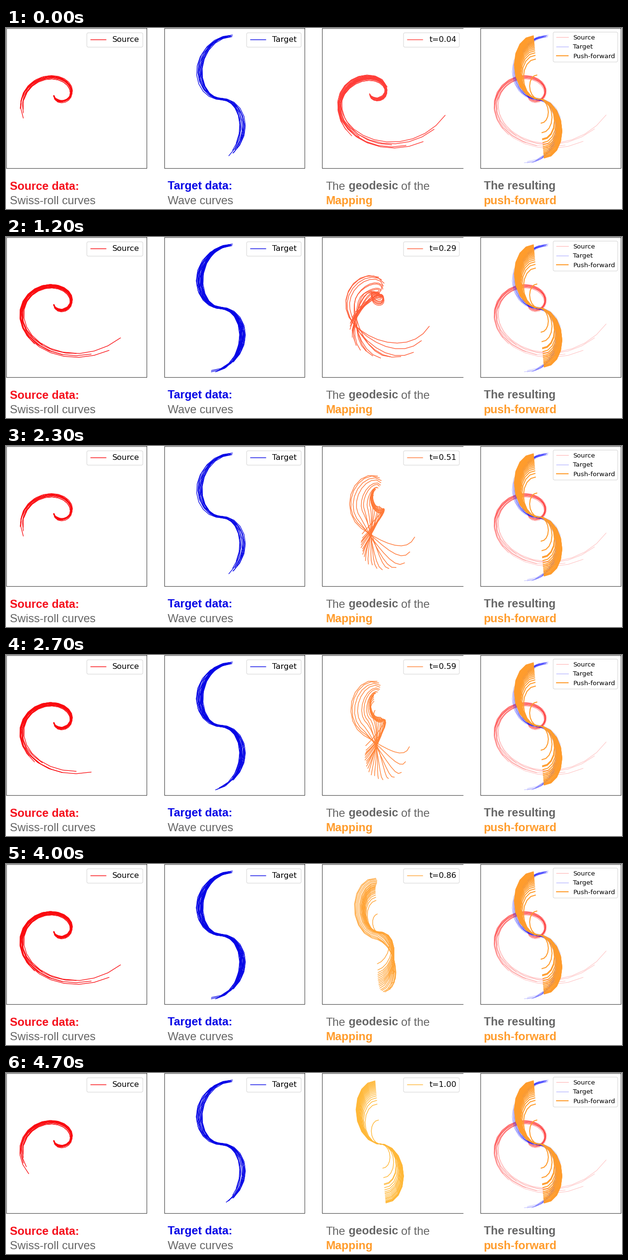
A matplotlib script for the animation above (4.8 s loop, 1280 by 378 pixels).

```python
import numpy as np
import matplotlib.pyplot as plt
from matplotlib.animation import FuncAnimation
from matplotlib.patches import FancyBboxPatch

W, H, DPI = 1280, 378, 100
PX = 72 / DPI  # points per pixel
FRAMES, STEP_MS = 48, 100
CURVES, SAMPLES, CYCLE = 21, 18, 23
RED, BLUE, ORANGE, GRAY = "#f5101c", "#0505e6", "#ff9c2c", "#666666"
rng = np.random.default_rng(11)

# Spiral whose radius of curvature grows with its heading (in quarter turns)
TURN = np.linspace(0, 6, 1201)
STEP = np.pi / 2 * (14.5 + 3 * TURN ** 2.27) * TURN[1]
SPIRAL_X = 99 + np.cumsum(STEP * np.sin(TURN * np.pi / 2))
SPIRAL_Y = 140 + .85 * np.cumsum(STEP * np.cos(TURN * np.pi / 2))


def roll(q):
    """Swiss-roll piece; a larger q starts and ends further out."""
    end = 3.85 + 1.8 * q ** 2
    start = 2.6 * q ** 2
    n = start + (end - start) * np.linspace(0, 1, SAMPLES) ** .75
    pts = np.column_stack([np.interp(n, TURN, SPIRAL_X),
                           np.interp(n, TURN, SPIRAL_Y)])
    mid = np.array([110, 135])
    return (mid + (pts - mid) * rng.uniform(.94, 1.06)
            + rng.uniform(-1, 1, 2) * (1.5, 2.5))


def s_shape(a, width, lean):
    """Two mirrored arcs around the origin, for angles from -pi to pi."""
    return np.column_stack([width * np.sin(a) - lean * a,
                            66 * np.sign(a) * (1 - np.cos(a))])


def wave(q):
    start = -np.pi + .6 * q * rng.random()
    pts = s_shape(np.linspace(start, 1.85 + 1.35 * q, SAMPLES), 56, 7.3)
    return (447, 148) + pts * (rng.uniform(.87, 1.13), 1) + rng.uniform(-2, 2, 2)


def push(q):
    top = .38 + .62 * q ** .3
    low = .53 + .5 * q ** .5 - .65 * q ** 10
    pts = s_shape(np.linspace(-np.pi, np.pi, SAMPLES), 45, -3.8)
    return (778, 148) + pts * np.where(pts[:, 1:] < 0, top, low)


spread = np.linspace(0, 1, CURVES)
rolls = [roll(q) for q in spread]
waves = [wave(q) for q in spread]
pushed = [push(q) for q in spread]

fig = plt.figure(figsize=(W / DPI, H / DPI), dpi=DPI, facecolor="white")
ax = fig.add_axes([0, 0, 1, 1])
ax.set_xlim(0, W)
ax.set_ylim(H, 0)
ax.axis("off")


def draw(curves, dx, color, width, alpha=1, z=2):
    return [ax.plot(c[:, 0] + dx, c[:, 1] + .5, color=color, lw=width * PX,
                    alpha=alpha, zorder=z)[0] for c in curves]


def label(x, y, text, size, color="black", font="DejaVu Sans", bold=False):
    return ax.text(x, y, text, fontsize=size * PX, color=color, family=font,
                   weight="bold" if bold else "normal", va="baseline", zorder=8)


def caption(x, y, text, color=GRAY, bold=False):
    label(x, y, text, 23.8, color, "Liberation Sans", bold)


def legend_box(x0, y0, x1, y1):
    return ax.add_patch(FancyBboxPatch(
        (x0 + 3, y0 + 3), x1 - x0 - 6, y1 - y0 - 6,
        boxstyle="round,pad=3,rounding_size=3.3", fc="white", ec="#cccccc",
        alpha=.85, lw=PX, zorder=6))


def key(x0, x1, y, color, width, alpha=1):
    return ax.plot([x0, x1], [y, y], color=color, lw=width * PX, alpha=alpha,
                   zorder=7, solid_capstyle="butt")[0]


def legend(x0, x1, text, color):
    return [legend_box(x0, 10, x1, 40),
            key(x0 + 6.5, x0 + 40, 23.5, color, 1.4),
            label(x0 + 53, 29.3, text, 16.4)]


def frame(x0, x1, right=True):
    xs, ys = [x1, x0, x0, x1], [1, 1, 293.3, 293.3]
    if right:
        xs, ys = xs + [x1], ys + [1]
    ax.plot(xs, ys, color="#303030", lw=PX, zorder=5,
            solid_joinstyle="miter", snap=False)


frame(1, 292.7)
frame(329.6, 620.9)
frame(657.3, 950, right=False)
frame(986.3, 1278)

roll_lines = draw(rolls, .5, "#fa0a0f", 1.3)
wave_lines = draw(waves, .5, BLUE, 1.3)
move_lines = draw(rolls, 656.5, "red", 1.4)
draw(rolls, 985.5, "red", 1, .25)
draw(waves, 657, "blue", 1, .25, 3)
draw(pushed, 329.5, ORANGE, 2, 1, 4)

data_keys = (legend(168, 284.3, "Source", "#fa0a0f")
             + legend(500, 613.3, "Target", BLUE))
_, move_key, move_text = legend(826, 942, "", "red")

legend_box(1137, 8.5, 1271, 71)
for row, (text, color, width, alpha) in enumerate([
        ("Source", "red", 1, .33), ("Target", "blue", 1, .36),
        ("Push-forward", ORANGE, 2, 1)]):
    y = 19.3 + 19.5 * row
    key(1142.5, 1168.5, y, color, width, alpha)
    label(1178.5, y + 4.7, text, 13.2)

caption(7.5, 337.5, "Source data:", RED, True)
caption(7.5, 368, "Swiss-roll curves")
caption(336, 337.5, "Target data:", BLUE, True)
caption(336, 368, "Wave curves")
caption(664.3, 337.5, "The")
caption(711.8, 337.5, "geodesic", bold=True)
caption(821.3, 337.5, "of the")
caption(664, 368, "Mapping", ORANGE, True)
caption(992.8, 337.5, "The resulting", bold=True)
caption(992.5, 368, "push-forward", ORANGE, True)


def update(n):
    # Two more curves per step, then a pause, then an empty panel
    shown = min(2 * ((n + 5) % CYCLE), CURVES - 1)
    for group in (roll_lines, wave_lines):
        for i, line in enumerate(group):
            line.set_visible(i < shown)
    for art in data_keys:
        art.set_visible(shown > 0)

    step = n - (n % 26 == 6)  # a short stall every 26 steps
    t = (step + 2) / 49
    color = (1, .22 + .5 * t, .22)
    for line, a, b in zip(move_lines, rolls, pushed):
        p = (1 - t) * (a + (656, 0)) + t * b + .5
        line.set_data(p[:, 0], p[:, 1])
        line.set_color(color)
    move_key.set_color(color)
    move_text.set_text(f"t={t:.2f}")
    return move_lines


anim = FuncAnimation(fig, update, frames=FRAMES, interval=STEP_MS,
                     repeat=True, repeat_delay=0)
plt.show()
```
